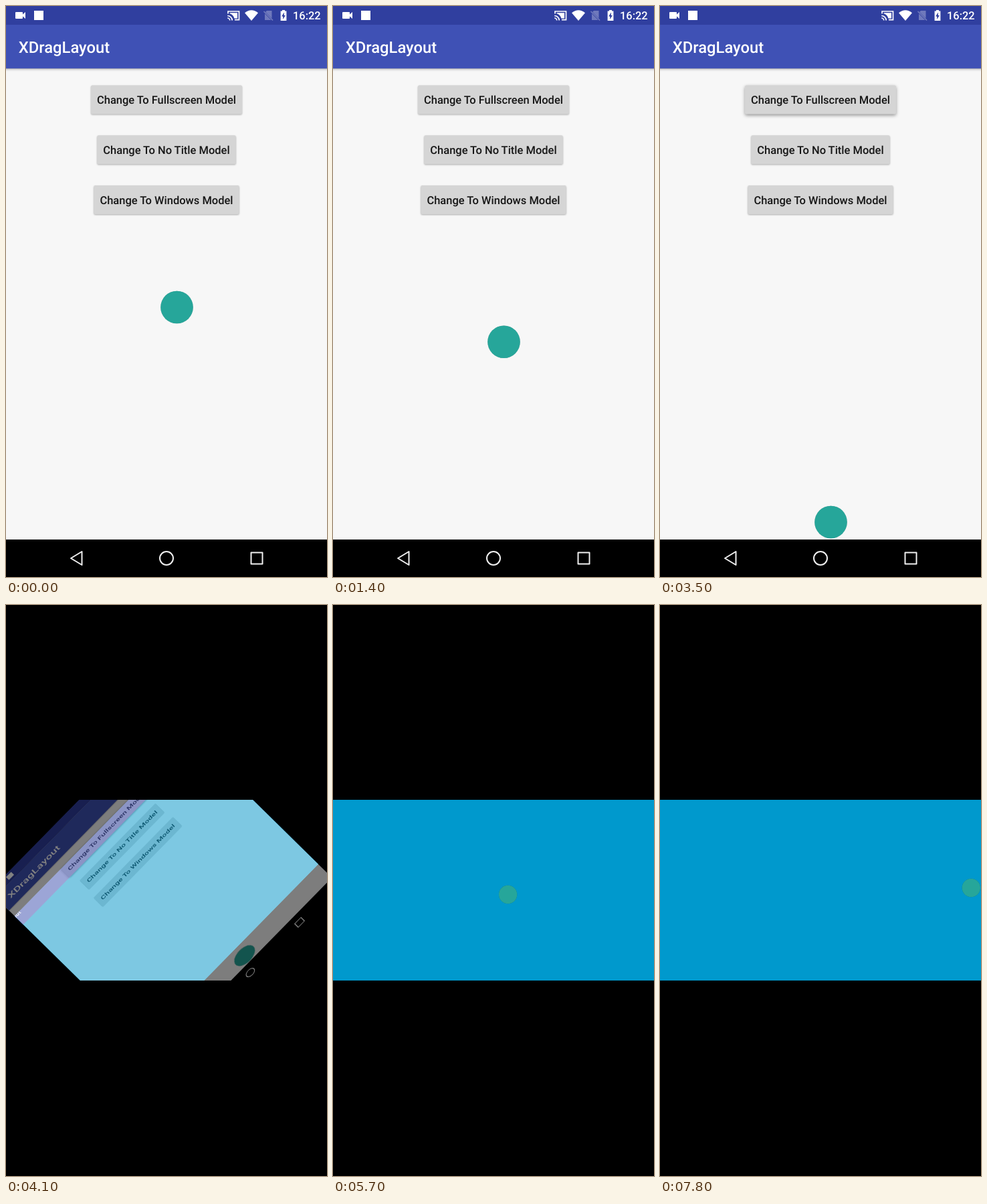
An HTML page for the animation above (8000 ms loop, 480x853 px).

```html
<!DOCTYPE html>
<html lang="en">
<head>
<meta charset="utf-8">
<title>XDragLayout</title>
<style>
  html, body { margin: 0; width: 100%; height: 100%; overflow: hidden; background: #000; }
  #view { position: absolute; left: 0; top: 0; width: 480px; height: 853px; overflow: hidden; background: #000; }
  #view.wide { clip-path: inset(291px 0 292px); }
  svg { position: absolute; left: 0; display: block; }
  #tall { top: 0; }
  #land { top: 291px; }
  text { font-family: Roboto, sans-serif; font-weight: 500; fill: #fff; text-rendering: geometricPrecision; }
  .button rect { fill: #d5d5d5; filter: drop-shadow(0 1px 1px rgba(0, 0, 0, .3)); }
  .button text { font-size: 16.48px; fill: #161616; text-anchor: middle; }
  .button.down rect { filter: drop-shadow(0 2px 2.5px rgba(0, 0, 0, .4)); }
  .ball { fill: #26a69a; filter: drop-shadow(0 .6px .6px rgba(0, 0, 0, .3)); }
  .line { fill: none; stroke: #fff; stroke-width: 1.7; }
  .keys { fill: none; stroke: #f0f0f0; stroke-width: 2; stroke-linejoin: round; }
</style>
</head>
<body>
<div id="view">
  <svg id="land" width="480" height="270">
    <rect width="480" height="270" fill="#0099cd"/>
    <g id="bar">
      <rect y="-36" width="480" height="36" fill="#3f51b5"/>
      <text x="10.5" y="-14.7" font-size="9.3">XDragLayout</text>
    </g>
    <circle id="wideBall" class="ball" r="13.7"/>
  </svg>

  <svg id="tall" width="480" height="853">
    <defs>
      <linearGradient id="shade" x2="0" y2="1">
        <stop offset="0" stop-opacity=".32"/>
        <stop offset=".4" stop-opacity=".1"/>
        <stop offset="1" stop-opacity="0"/>
      </linearGradient>
    </defs>
    <rect width="480" height="853"/>
    <rect y="28" width="480" height="769" fill="#f7f7f7"/>
    <rect y="93" width="480" height="5" fill="url(#shade)"/>
    <rect y="28" width="480" height="65.3" fill="#3f51b5"/>
    <rect width="480" height="28" fill="#303f9f"/>
    <text x="18.7" y="70" font-size="23.75">XDragLayout</text>

    <g id="status" fill="#fff">
      <rect x="14" y="9" width="11" height="10" rx="1"/>
      <path d="M24 13.5l5-4.5v10l-5-4.5z"/>
      <rect x="42" y="7" width="14" height="14"/>
      <path class="line" d="M332 11.500V8H348.500V20.700H342M331.200 14.500a7 7 0 0 1 7 7M331.200 18a3.500 3.500 0 0 1 3.500 3.500"/>
      <path d="M334.500 10.300H346V18.600H341.400Q339.700 12.500 334.500 11.300z"/>
      <path d="M357 10.200Q367 2.400 377 10.200L367 22z"/>
      <g opacity=".3">
        <path d="M390 7H397.500V18.500L388 9zM387 11.500L396.500 21H387z"/>
        <path class="line" d="M385.500 8L399 21.500"/>
      </g>
      <path d="M410.600 7.500H413V6H417V7.500H419.400V22H410.600z"/>
      <path fill="#303f9f" d="M415.800 9.500L412.200 15.500H414.200V20L417.800 14H415.800z"/>
      <text x="429" y="20.300" font-size="16.400">16:22</text>
    </g>

    <g id="buttons"></g>
    <circle id="tallBall" class="ball" r="24.300"/>

    <g class="keys">
      <path d="M97 825L113.500 815V835z"/>
      <circle cx="240" cy="825" r="10"/>
      <rect x="366.500" y="816.500" width="17" height="17"/>
    </g>
  </svg>
</div>
<script>
  const LOOP = 8000, STEP = 100, FIT = 270 / 480;
  const $ = id => document.getElementById(id);

  $("buttons").innerHTML = ["Fullscreen", "No Title", "Windows"].map((name, i) =>
    `<g class="button" transform="translate(240 ${118.5 + 74.7 * i})">
      <rect height="43" rx="2"/><text y="27.8">Change To ${name} Model</text>
    </g>`).join("");

  for (const button of document.querySelectorAll(".button")) {
    const [box, label] = button.children;
    const width = label.getComputedTextLength() + 18;
    box.setAttribute("x", -width / 2);
    box.setAttribute("width", width);
  }
  const first = document.querySelector(".button");

  // Progress from 0 to 1 between two times; a power above 1 slows towards the end
  function ramp(t, from, to, power = 1) {
    const k = Math.min(1, Math.max(0, (t - from) / (to - from)));
    return 1 - (1 - k) ** power;
  }

  function place(ball, x, y) {
    ball.setAttribute("cx", x);
    ball.setAttribute("cy", y);
  }

  // Drag right, snap back, drag down
  function drawTall(t) {
    const x = 255.5 + 199 * (ramp(t, 0, 1000) - ramp(t, 1000, 1200));
    place($("tallBall"), x, 450 + 321 * ramp(t, 1150, 2700));
    first.classList.toggle("down", t >= 3400);
  }

  // Drag right, up, down, then right to the edge
  function drawLand(t) {
    const x = 13.8 + 260.2 * ramp(t, 5200, 5725) + 191.3 * ramp(t, 7100, 7800, 2);
    const y = 141.5 - 127 * ramp(t, 5800, 6400) + 117 * ramp(t, 6700, 7100);
    place($("wideBall"), x, y);
  }

  // The old screen turns, stretches to the wide shape and fades out
  function turn(t) {
    const p = ramp(t, 3800, 4600, 1.45);
    const angle = `rotate(${-90 * (1 - p)}deg)`;
    const sx = 1 + p * (1 / FIT - 1), sy = 1 - p * (1 - FIT);
    const tall = $("tall").style, land = $("land").style;
    tall.transform = `translateY(-.5px) ${angle} scale(${FIT * sx}, ${FIT * sy})`;
    tall.opacity = 1 - p;
    land.transform = angle;
    land.clipPath = `inset(0 ${240 - 135 * sx}px)`;
    $("bar").setAttribute("transform", `translate(0 ${36 * (1 - p)})`);
  }

  function draw(t) {
    const wide = t >= 3600;
    $("view").classList.toggle("wide", wide);
    $("land").style.visibility = wide ? "visible" : "hidden";
    drawTall(t);
    if (wide) {
      drawLand(t);
      turn(t);
    } else {
      $("tall").style.transform = "none";
      $("tall").style.opacity = 1;
    }
  }

  const start = performance.now();
  function tick() {
    const t = (performance.now() - start + 4) % LOOP;
    draw(Math.floor(t / STEP) * STEP);
    requestAnimationFrame(tick);
  }
  tick();
</script>
</body>
</html>
```
